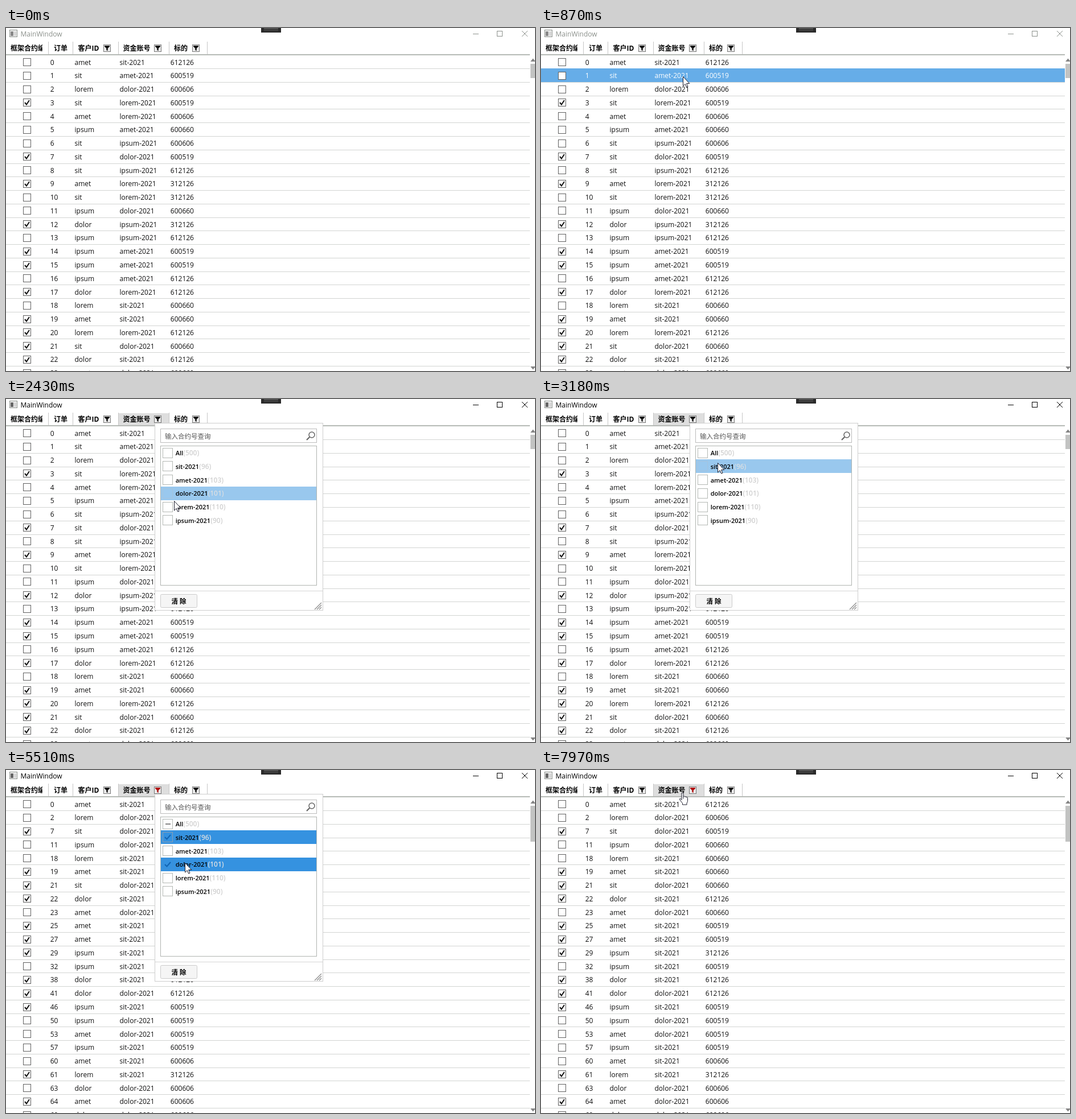
Recreate the animation shown at these times as an HTML page with a canvas. Size 929 by 603 pixels, loop 8000 ms.

```html
<!DOCTYPE html>
<html lang="zh">
<head>
<meta charset="utf-8">
<title>MainWindow</title>
<style>
html, body { margin: 0; width: 929px; height: 603px; overflow: hidden; background: #fff; }
canvas { display: block; }
</style>
</head>
<body>
<canvas id="stage" width="929" height="603"></canvas>
<script>
const g = document.getElementById('stage').getContext('2d');
const LOOP = 8000, STEP = 66, PITCH = 23.76;
const FACE = '"Open Sans", "Noto Sans CJK SC", "Noto Sans CJK", sans-serif';
const OPEN = 1480, PICK_SIT = 3450, PICK_DOLOR = 5380, CLOSE = 7640;

const WORDS = { a: 'amet', s: 'sit', l: 'lorem', i: 'ipsum', d: 'dolor' };
const CODES = { 3: '312126', 1: '612126', 5: '600519', 0: '600606', 6: '600660' };

// id, client (capital = ticked), account, code
const rows = (
  '0as1 1sa5 2ld0 3Sl5 4al0 5ia6 6si0 7Sd5 8si1 9Al3 10sl3 11id6 12Di3 13ii1 ' +
  '14Ia5 15Ia5 16ia1 17Dl1 18ls6 19As6 20Ll1 21Sd6 22Ds1 23ad6 25As5 27As5 29Is3 ' +
  '32is5 38Ds1 41Dd1 46Is5 50id5 53ad5 57is5 60as0 61Ls3 63dd0 64Ad0 69dd0 80Is5 ' +
  '90Ds5 92ls0 99ls1 108Ds5 113Ss5 116as6 119is6 121Ss1 126as0 134Ls0'
).split(' ').map(s => {
  const [, id, who, acct, code] = s.match(/(\d+)(\w)(\w)(\w)/);
  const key = who.toLowerCase();
  return { id, ticked: who !== key, client: WORDS[key], key: acct,
           account: WORDS[acct] + '-2021', code: CODES[code] };
});

const options = [['All', 500], ['sit-2021', 96], ['amet-2021', 103],
                 ['dolor-2021', 101], ['lorem-2021', 110], ['ipsum-2021', 90]];

// start time, then [step, x, y] points
const moves = [
  [130, [0, 118, 585], [1, 140, 440], [2, 166, 300], [3, 187, 213], [6, 222, 140], [11, 249, 85]],
  [940, [0, 251, 80], [3, 266, 50], [5, 275, 36]],
  [2090, [0, 276, 48], [2, 281, 110], [5, 295, 179], [7, 297, 182], [9, 299, 158], [11, 300, 134]],
  [2910, [0, 301, 127], [2, 305, 113]],
  [3180, [0, 310, 112], [1, 316, 110]],
  [4640, [0, 316, 130], [2, 317, 147], [5, 314, 163]],
  [6830, [0, 311, 155], [3, 316, 100], [5, 322, 55], [8, 330, 14]],
  [7640, [0, 326, 5], [2, 300, 8], [5, 248, 39]]
];

function pointer(t, lag = 0) {
  const move = moves.filter(m => m[0] <= t).pop();
  if (!move) return null;
  const [start, ...pts] = move;
  const k = Math.max(0, Math.floor((t - start) / STEP) - lag);
  const n = pts.findIndex(p => p[0] > k);
  if (n < 0) return { x: pts[pts.length - 1][1], y: pts[pts.length - 1][2] };
  const [a, b] = [pts[n - 1], pts[n]];
  const f = (k - a[0]) / (b[0] - a[0]);
  return { x: Math.round(a[1] + (b[1] - a[1]) * f), y: a[2] + (b[2] - a[2]) * f };
}

function box(x, y, w, h, color) {
  g.fillStyle = color;
  g.fillRect(x, y, w, h);
}

function frame(x, y, w, h, line, fill) {
  if (fill) box(x, y, w, h, fill);
  g.strokeStyle = line;
  g.lineWidth = 1;
  g.strokeRect(x + .5, y + .5, w - 1, h - 1);
}

function text(s, x, cy, color = '#101010', size = 12, weight = 400) {
  g.font = `${weight} ${size}px ${FACE}`;
  g.fillStyle = color;
  g.fillText(s, x, cy + 4.5);
  return g.measureText(s).width;
}

function poly(pts, color, width, fill) {
  g.beginPath();
  pts.forEach(([x, y]) => g.lineTo(x, y));
  if (fill) { g.closePath(); g.fillStyle = fill; g.fill(); }
  if (!color) return;
  g.strokeStyle = color;
  g.lineWidth = width;
  g.stroke();
}

function titleBar(active) {
  const ink = active ? '#000' : '#8c918c';
  frame(6, 3, 14, 13, '#8a8f8a', '#f2f2f2');
  box(8, 6, 5, 8, active ? '#666' : '#888');
  box(14, 6, 4, 8, '#d4d4d4');
  text('MainWindow', 25.5, 10, ink);
  box(448, 0, 35, 8, '#2b2b2b');
  box(453, 1, 25, 1, '#777');
  box(453, 4, 25, 1, '#555');
  box(820, 10, 10, 1, ink);
  frame(862, 5, 10, 10, ink);
  poly([[906, 5], [916, 15]], ink, 1);
  poly([[916, 5], [906, 15]], ink, 1);
}

function filterButton(x, active) {
  frame(x, 29, 13, 13, '#777', '#ececec');
  const c = active ? '#b01010' : '#111';
  poly([[x + 2, 31], [x + 11, 31], [x + 11, 32.5], [x + 7.7, 36], [x + 7.7, 40],
        [x + 5.3, 39], [x + 5.3, 36], [x + 2, 32.5]], null, 0, c);
}

function header(hot, filtered) {
  if (hot) box(197, 25, 90, 21, '#dedede');
  box(0, 46, 920, 2, '#b6bab6');
  for (const x of [74, 117, 197, 286, 353]) box(x, 24, 1, 22, '#c6c6c6');
  g.save();
  g.beginPath();
  g.rect(0, 24, 64, 22);
  g.clip();
  text('框架合约编号', 8, 35, '#000', 12, 700);
  g.restore();
  text('订单', 84, 35, '#000', 12, 700);
  text('客户ID', 126.5, 35, '#000', 12, 700);
  text('资金账号', 205.5, 35, '#000', 12, 700);
  text('标的', 295, 35, '#000', 12, 700);
  filterButton(171, false);
  filterButton(260, filtered);
  filterButton(327, false);
}

const lineY = i => Math.round(71.2 + PITCH * i);

function grid(list, hover) {
  list.slice(0, 24).forEach((r, i) => {
    const cy = 60.1 + PITCH * i, top = i ? lineY(i - 1) : 48;
    const lit = i === hover, ink = lit ? '#fff' : '#101010';
    box(0, lineY(i), 920, 1, '#d2d4d2');
    if (lit) box(0, top, 920, lineY(i) - top, '#66ade8');
    const y = Math.round(cy) - 7;
    frame(30, y, 14, 14, '#606060', '#fff');
    if (r.ticked) poly([[33, y + 7], [36, y + 10.5], [41, y + 3]], '#151515', 2);
    text(r.id, 77.7, cy, ink);
    text(r.client, 120.5, cy, ink);
    text(r.account, 199.5, cy, ink);
    text(r.code, 288.8, cy, ink);
  });
}

function scrollBar(total) {
  poly([[921, 59], [925.5, 53.5], [930, 59]], null, 0, '#858585');
  poly([[921, 595], [925.5, 600.5], [930, 595]], null, 0, '#858585');
  box(921, 63, 8, Math.round(527 * 23.6 / total), '#c2c3c2');
}

function option(i, hover, picked, partial) {
  const [name, count] = options[i];
  const cy = 94.6 + 23.75 * i, top = Math.round(cy - 12), y = Math.round(cy) - 9;
  const band = picked ? '#3592e0' : hover ? '#99c8ee' : null;
  if (band) box(272, top, 273, 24, band);
  const edge = picked ? (hover ? '#3e8fd6' : '#8a9fb3') : hover ? '#a3c3de' : '#b4b8b4';
  frame(275, y, 18, 18, edge, band || '#fff');
  if (partial) box(280, y + 8, 9, 2, '#858585');
  if (picked) poly([[279, y + 9], [282.5, y + 12.5], [289, y + 5]], '#1265b3', 2);
  const w = text(name, 297.7, cy, '#000', 11, 600);
  text(`(${count})`, 297.7 + w, cy, band ? '#d9dee2' : '#d0d0d0', 12, 600);
}

function popup(alpha, hover, picks) {
  g.save();
  g.globalAlpha = alpha;
  frame(261, 42, 296, 330, '#cdcdcd', '#fff');
  frame(271, 52, 275, 25, '#bcbcbc', '#fff');
  text('输入合约号查询', 279, 65, '#555', 11.5);
  g.beginPath();
  g.arc(537, 63, 5, 0, 7);
  g.strokeStyle = '#666';
  g.lineWidth = 1.5;
  g.stroke();
  poly([[533.2, 66.8], [528, 72]], '#666', 2.2);
  frame(271, 82, 275, 246, '#b0b4b0', '#fff');
  options.forEach(([name], i) =>
    option(i, i === hover, i > 0 && picks.includes(name[0]), !i && picks !== ''));
  box(262, 337, 294, 1, '#d6d6d6');
  g.beginPath();
  g.roundRect(271.5, 343.5, 64, 23, 2);
  g.fillStyle = '#f5f5f5';
  g.fill();
  g.strokeStyle = '#cbcbcb';
  g.lineWidth = 1;
  g.stroke();
  text('清 除', 290.5, 355, '#000', 11.5, 700);
  for (const d of [12, 8, 4]) poly([[554 - d, 370], [554, 370 - d]], '#8c8c8c', 1.2);
  g.restore();
}

const ARROW = new Path2D('M0 0V16.5L3.7 13L6.2 18.6L8.5 17.6L6.1 12H11.3Z');
const HAND = new Path2D('M4 1.2Q5.5-.5 7 1.2V7Q8.6 6 9.6 7.6Q11.2 6.6 12 8.2' +
  'Q14.2 7.6 14.5 9.8V15Q14.3 17 13 18.7V21.5H5.5V19L1 13.2Q-.5 10.6 1.7 10.5L4 13Z');

function cursor(p, hand) {
  g.save();
  g.translate(p.x - (hand ? 5.5 : 0) + .5, p.y + .5);
  const shape = hand ? HAND : ARROW;
  g.fillStyle = '#fff';
  g.fill(shape);
  g.strokeStyle = '#1c1c2c';
  g.lineWidth = 1;
  g.lineJoin = 'round';
  g.stroke(shape);
  if (hand) poly([[7, 7], [7, 11]], '#1c1c2c', 1);
  g.restore();
}

function draw(t) {
  box(0, 0, 929, 603, '#fff');
  const p = pointer(t), felt = pointer(t, .1);
  const open = t >= OPEN && t < CLOSE;
  const picks = t < PICK_SIT ? '' : t < PICK_DOLOR ? 's' : 'sd';
  const list = picks ? rows.filter(r => picks.includes(r.key)) : rows;
  const total = { '': 500, s: 96, sd: 197 }[picks];

  const inHead = p && p.x > 197 && p.x < 286 && p.y > 24 && p.y < 47;
  const gridHover = felt && t < OPEN && felt.y > 48 ? Math.floor((felt.y - 47.4) / PITCH) : -1;
  const listHover = felt && felt.y > 82 ? Math.floor((felt.y - 82.8) / 23.75) : -1;

  grid(list, gridHover);
  header(open || inHead, picks !== '');
  scrollBar(total);
  titleBar(t >= OPEN);

  const alpha = open ? Math.min(1, (Math.floor((t - OPEN) / 80) + 1) / 5)
                     : t < OPEN ? 0 : 1 - (Math.floor((t - CLOSE) / STEP) + 1) / 4;
  if (alpha > 0) popup(alpha, listHover, picks);
  if (p) cursor(p, inHead && (t < 2090 || t >= CLOSE));
}

function tick(now) {
  draw(now % LOOP);
  requestAnimationFrame(tick);
}
draw(0);
requestAnimationFrame(tick);
</script>
</body>
</html>
```
